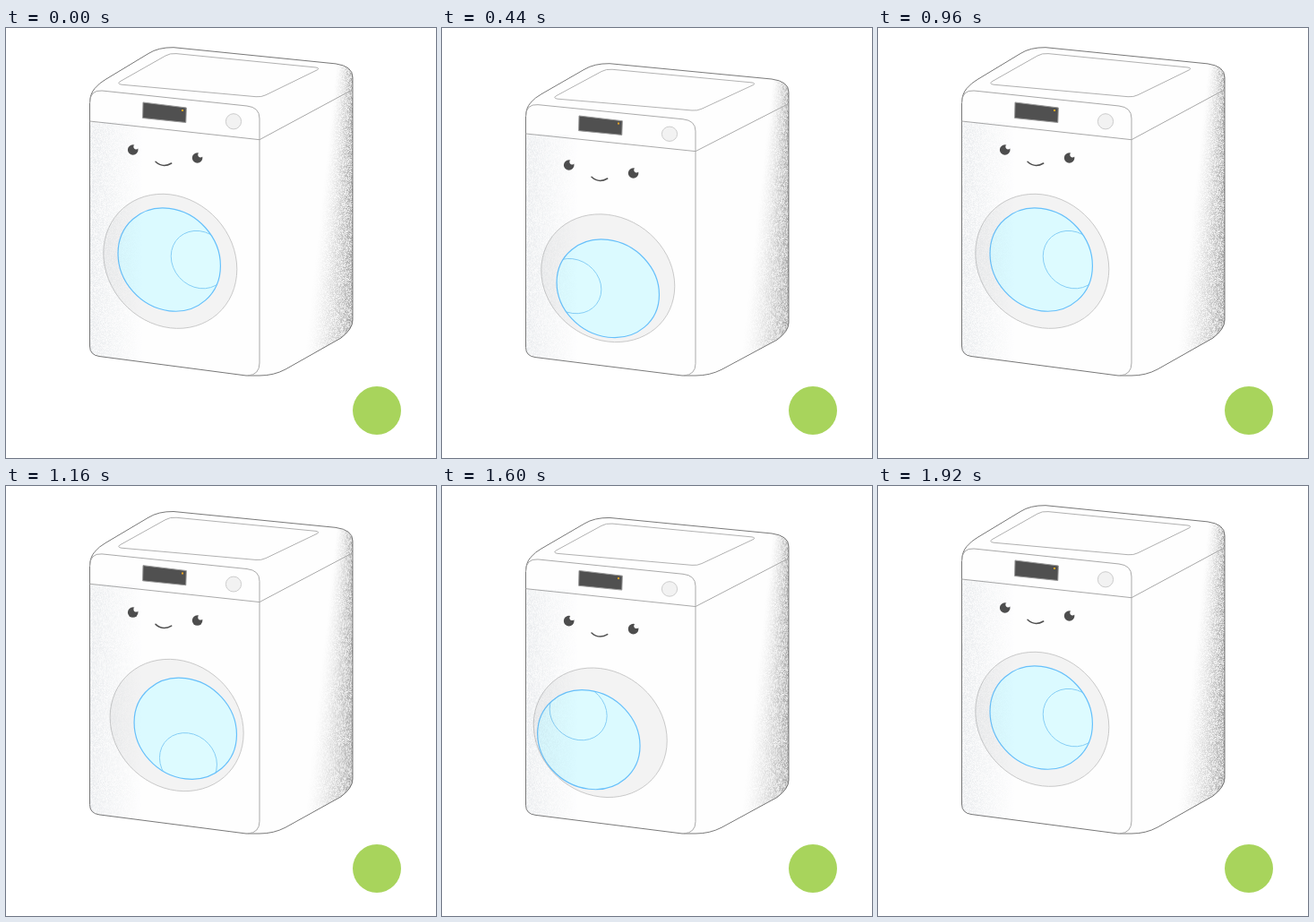
Recreate the animation shown at these times as an HTML page with a canvas. Size 480 by 480 pixels, loop 1.96 s.

```html
<!DOCTYPE html>
<html lang="en">
<head>
<meta charset="utf-8">
<title>Washing machine</title>
<style>
  html, body { margin: 0; width: 100%; height: 100%; overflow: hidden; background: #fff; }
  canvas { display: block; }
</style>
</head>
<body>
<canvas id="stage" width="480" height="480"></canvas>
<script>
const ctx = document.getElementById('stage').getContext('2d');
const STEP = 40, STEPS = 49, CYCLE = 24, FLOOR = 388;
const rad = deg => deg * Math.PI / 180;

const body = new Path2D(`M93.5 355V84Q93.5 74 99 67.5Q104 61.5 111 57.5L159 28.5Q170 21.5 187 21.7
  L368 39.9Q387 42.5 387 55V326Q387 336 374 346L312 381Q299 388 283 388L268 388
  L104 366.5Q93.5 365 93.5 355Z`);
const side = new Path2D(`M283 125L387 69V326Q387 336 374 346L312 381Q299 388 283 388Z
  M283 125V100L370 41Q387 43 387 56V69Z`);
const seams = new Path2D(`M93.5 84Q93.5 69 107 70L269 87Q283 88.5 283 101V374Q283 387 270 388
  M93.5 104L283 124.7L387 68.7`);
const lid = new Path2D(`M128 59.3L178 31Q183 28 190 28.6L346 44Q351 45 347 47
  L290 74.8Q285 77.3 279 76.7L129 63.2Q123 62.2 128 59.3Z`);
const panel = new Path2D('M153 83L201.3 89L200.8 105.5L152.6 100.5Z');
const front = new Path2D(`M93.5 355V84Q93.5 69 107 70L269 87Q283 88.5 283 101V374
  Q283 388 268 388L104 366.5Q93.5 365 93.5 355Z`);

function random(seed) {
  return () => {
    seed = (seed * 1664525 + 1013904223) >>> 0;
    return seed / 4294967296;
  };
}

// Grainy shading; depth(x, y) is the strongest opacity at a point.
function grain(seed, color, left, right, depth) {
  const sheet = document.createElement('canvas');
  sheet.width = sheet.height = 480;
  const g = sheet.getContext('2d'), rnd = random(seed);
  g.fillStyle = color;
  for (let y = 40; y < FLOOR; y++) {
    for (let x = left; x < right; x++) {
      g.globalAlpha = depth(x, y) * (0.15 + 0.85 * rnd());
      g.fillRect(x, y, 1, 1);
    }
  }
  return sheet;
}

const sideGrain = grain(7, '#5a5a5a', 325, 388, (x, y) => {
  const start = 368 - (y - 40) * 0.11;
  return 0.62 * Math.max(0, (x - start) / (387 - start)) ** 1.5;
});
const frontGrain = grain(23, '#6b7a8c', 94, 152, (x, y) =>
  y < 105 ? 0 : 0.15 * (1 - (x - 94) / 58));

// Smooth periodic curve through [step, value] points.
function loopCurve(points) {
  const count = points.length;
  const at = i => {
    const turn = Math.floor(i / count), p = points[i - turn * count];
    return [p[0] + turn * CYCLE, p[1]];
  };
  const slope = i => (at(i + 1)[1] - at(i - 1)[1]) / (at(i + 1)[0] - at(i - 1)[0]);
  return n => {
    let i = 0;
    while (at(i + 1)[0] <= n) i++;
    const [x0, y0] = at(i), [x1, y1] = at(i + 1), h = x1 - x0, u = (n - x0) / h;
    const v = 1 - u;
    return v * v * ((1 + 2 * u) * y0 + u * h * slope(i)) +
      u * u * ((1 + 2 * v) * y1 - v * h * slope(i + 1));
  };
}

const drumLead = loopCurve([[0, 0], [5, 10], [11, 19], [16, 9], [19, -10]]);
const drumReach = loopCurve([[0, 34], [5, 36.6], [11, 39.5], [16, 32.6], [19, 30]]);

function paint(path, fill, stroke, width = 1) {
  if (fill) { ctx.fillStyle = fill; ctx.fill(path); }
  if (stroke) { ctx.strokeStyle = stroke; ctx.lineWidth = width; ctx.stroke(path); }
}

// A circle lying on the slanted front.
function disc(x, y, r, squash = 1, slant = 0.12) {
  const circle = new Path2D(), path = new Path2D();
  circle.arc(0, 0, r, 0, 2 * Math.PI);
  path.addPath(circle, new DOMMatrix([1, slant, 0, squash, x, y]));
  return path;
}

function shade(area, sheet) {
  ctx.save();
  ctx.clip(area);
  ctx.drawImage(sheet, 0, 0);
  ctx.restore();
}

function drawCase() {
  paint(body, '#fefefe', '#777');
  shade(side, sideGrain);
  paint(lid, null, '#b0b0b0');
  paint(seams, null, '#a8a8a8');
  paint(panel, '#505050', '#999');
  ctx.fillStyle = '#f5a623';
  ctx.fillRect(196, 91, 2, 2);
  paint(disc(254, 104.3, 8.6, 1, 0), '#f2f2f2', '#ccc');
}

function drawDoor(n, a, squash) {
  const ringX = 183.3 + 7.6 * Math.sin(a);
  const ringY = 270 - 9.7 * Math.cos(a - rad(3));
  const glassX = 181.2 + 19.5 * Math.sin(a + rad(3));
  const glassY = 275 - 16.4 * Math.cos(a);
  const glass = disc(glassX, glassY, 57.2, squash);
  paint(disc(ringX, ringY, 74.5, squash), '#f3f3f3', '#c9c9c9');
  paint(glass, '#dbfaff');

  const turn = a + rad(drumLead(n)), reach = drumReach(n);
  ctx.save();
  ctx.clip(glass);
  paint(disc(glassX + reach * Math.cos(turn), glassY + reach * Math.sin(turn), 32, squash),
    '#ddfbff', '#85cdf5');
  ctx.restore();
  paint(glass, null, '#66c0fb', 1.2);
}

function drawFace(a) {
  ctx.save();
  ctx.translate(0, 9 * (Math.cos(rad(10)) - Math.cos(a - rad(10))));
  for (const [x, y] of [[141.7, 136], [213.6, 145]]) {
    paint(disc(x, y, 5.8, 1, 0), '#4d4d4d');
    paint(disc(x + 3.5, y - 3.4, 2.8, 1, 0), '#fefefe');
  }
  ctx.lineCap = 'round';
  paint(new Path2D('M167 149.3Q175 156.6 184.7 151'), null, '#505050', 1.5);
  ctx.restore();
}

function draw(n) {
  const a = 2 * Math.PI * n / CYCLE;
  const squash = 0.975 + 0.025 * Math.cos(a);
  const stand = () => ctx.setTransform(1, 0, 0, squash, 0, FLOOR * (1 - squash));

  ctx.setTransform(1, 0, 0, 1, 0, 0);
  ctx.fillStyle = '#fff';
  ctx.fillRect(0, 0, 480, 480);
  paint(disc(414, 427, 27, 1, 0), '#a8d45c');

  stand();
  drawCase();
  ctx.setTransform(1, 0, 0, 1, 0, 0);
  drawDoor(n, a, squash);
  drawFace(a);
  stand();
  shade(front, frontGrain);
}

const begin = performance.now();
function tick() {
  const step = Math.floor((performance.now() - begin) / STEP) % STEPS;
  draw(step % CYCLE);
  requestAnimationFrame(tick);
}
tick();
</script>
</body>
</html>
```
